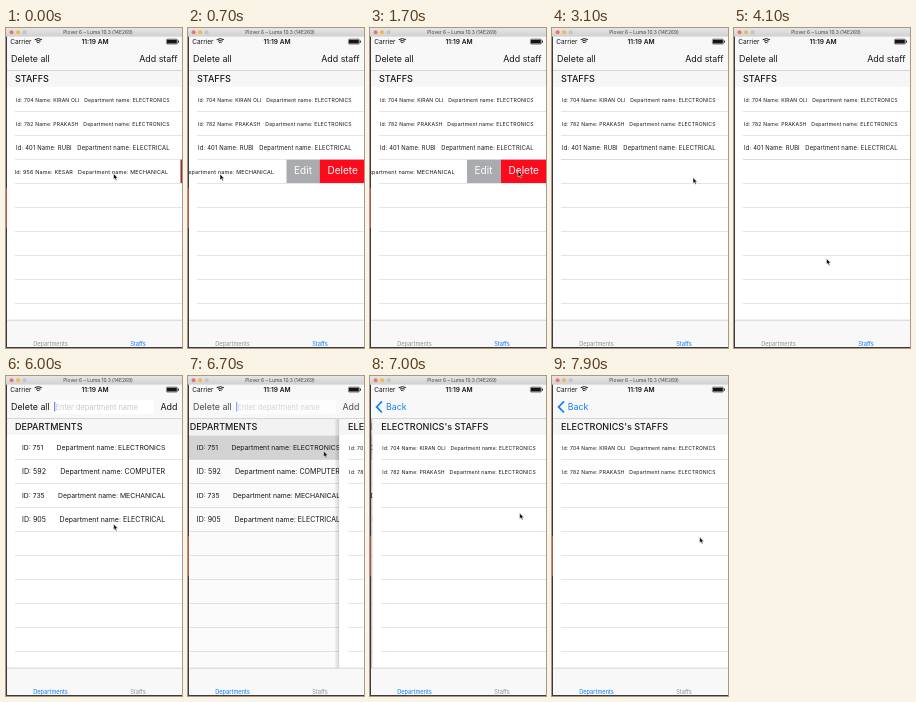
An HTML page for the animation above (8 s loop, 176 px wide and 320 px high).

```html
<!DOCTYPE html>
<html lang="en">
<head>
<meta charset="utf-8">
<title>Staff directory</title>
<style>
html, body { margin: 0; width: 100%; height: 100%; overflow: hidden; background: #fff; }
svg { display: block; width: 100vw; height: 100vh; }
text { font-family: Inter, Roboto, "Liberation Sans", sans-serif; white-space: pre; }
</style>
</head>
<body>
<svg id="stage" viewBox="0 0 176 320">
  <defs>
    <linearGradient id="bar" x2="0" y2="1"><stop stop-color="#e6e6e6"/><stop offset="1" stop-color="#d0d0d0"/></linearGradient>
    <linearGradient id="shade"><stop stop-color="#000" stop-opacity="0"/><stop offset="1" stop-color="#000" stop-opacity=".16"/></linearGradient>
    <clipPath id="rowClip"><rect id="rowWindow" y="131.5" width="176" height="23.5"/></clipPath>
  </defs>
</svg>
<script>
const LOOP = 8000, STEP = 100, W = 174;
const BLUE = '#0d7df7', GRAY = '#929292', INK = '#151515';
const TOP = 42.6, ROW = 24, FIRST = 59.5, TAB = 292;
const stage = document.getElementById('stage');

function add(parent, tag, attrs = {}, label) {
  const el = document.createElementNS('http://www.w3.org/2000/svg', tag);
  for (const key in attrs) el.setAttribute(key, attrs[key]);
  if (label !== undefined) el.textContent = label;
  parent.append(el);
  return el;
}
const group = (parent, attrs) => add(parent, 'g', attrs);
const rect = (parent, x, y, width, height, fill, more) =>
  add(parent, 'rect', { x, y, width, height, fill, ...more });
const text = (parent, x, y, size, label, fill = INK, more) =>
  add(parent, 'text', { x, y, 'font-size': size, fill, ...more }, label);
const move = (el, x, y = 0) => el.setAttribute('transform', `translate(${x} ${y})`);
const fade = (el, value) => el.setAttribute('opacity', value);

const clamp = v => Math.max(0, Math.min(1, v));
const ease = v => v * v * (3 - 2 * v);
const span = (t, from, to) => ease(clamp((t - from) / (to - from)));

// Piecewise eased path through [time, ...values] stops.
function track(stops, t) {
  let i = 1;
  while (i < stops.length - 1 && t > stops[i][0]) i++;
  const [t0, ...a] = stops[i - 1], [t1, ...b] = stops[i];
  const p = span(t, t0, t1);
  return a.map((v, k) => v + (b[k] - v) * p);
}

// Cell labels shrink their type to the room they have.
function cellLabel(parent, x, row, label, room, more) {
  const el = text(parent, x, 0, 10, label, INK, more);
  const size = 10 * room / el.getComputedTextLength();
  el.setAttribute('font-size', size);
  el.setAttribute('y', FIRST + ROW * row + 12.2 + size * .36);
}
const staffLabel = (parent, row, [id, name, dept]) =>
  cellLabel(parent, 10, row, `Id: ${id} Name: ${name}\u00a0\u00a0\u00a0Department name: ${dept}`,
    154, { 'letter-spacing': '.03em' });

function lines(parent, from, to) {
  for (let i = from; i <= to; i++)
    rect(parent, 9, FIRST + ROW * i - .4, 167, .6, '#d3d3d6');
}
function page(title) {
  const g = group(stage);
  rect(g, 0, TOP, 176, TAB - TOP, '#fff');
  rect(g, 0, TOP, 176, FIRST - TOP - .8, '#f6f6f6');
  text(g, 9, 54.3, 9.05, title, '#1c1c1c', { 'font-weight': 500 });
  return g;
}

const staff = [
  ['704', 'KIRAN OLI', 'ELECTRONICS'],
  ['782', 'PRAKASH', 'ELECTRONICS'],
  ['401', 'RUBI', 'ELECTRICAL'],
  ['956', 'KESAR', 'MECHANICAL']
];
const depts = [['751', 'ELECTRONICS'], ['592', 'COMPUTER'], ['735', 'MECHANICAL'], ['905', 'ELECTRICAL']];

// Staff list with a swipeable fourth row
const staffPage = page('STAFFS');
lines(staffPage, 1, 3);
staff.slice(0, 3).forEach((s, i) => staffLabel(staffPage, i, s));
const below = group(staffPage);
lines(below, 4, 10);
const swipeRow = group(staffPage, { 'clip-path': 'url(#rowClip)' });
const rowText = group(swipeRow);
rect(rowText, 0, 131.8, 176, 22.8, '#fff');
move(group(rowText), 0);
staffLabel(rowText, 3, staff[3]);
function action(label, fill) {
  const g = group(swipeRow);
  const back = rect(g, 0, 131.5, 180, 23.5, fill);
  text(g, 7.6, 146.3, 10, label, '#fff');
  return { g, back };
}
const edit = action('Edit', '#a9abae');
const del = action('Delete', '#fc0b1c');

// Department list
const deptPage = page('DEPARTMENTS');
const picked = rect(deptPage, 0, FIRST, 176, ROW, '#d6d6d7');
lines(deptPage, 1, 9);
depts.forEach(([id, name], i) =>
  cellLabel(deptPage, 16, i, `ID: ${id}${'\u00a0'.repeat(7)}Department name: ${name}`, 143.5));
const dim = rect(deptPage, 0, TOP, 176, TAB - TOP, '#000');

// Staff of one department
const detail = page("ELECTRONICS's STAFFS");
lines(detail, 1, 9);
staff.slice(0, 2).forEach((s, i) => staffLabel(detail, i, s));
const shadow = rect(detail, -5, TOP, 5, TAB - TOP, 'url(#shade)');

// Navigation bar
rect(stage, 0, 8, 176, TOP - 8, '#f8f8f8');
rect(stage, 0, TOP - .5, 176, .6, '#bebec0');
const staffNav = group(stage), deptNav = group(stage), backNav = group(stage);
for (const [nav, label] of [[staffNav, 'Add staff'], [deptNav, 'Add']]) {
  text(nav, 5, 34, 8.9, 'Delete all');
  text(nav, 171.5, 34, 8.9, label, INK, { 'text-anchor': 'end' });
}
rect(deptNav, 46.5, 24, 101.5, 14, '#fff', { rx: 2 });
text(deptNav, 49.6, 33.5, 7.4, 'Enter department name', '#c9c9ce');
const caret = rect(deptNav, 48.2, 26, 1, 9.5, '#3f72e8');
add(backNav, 'path', { d: 'M12 25.3L6.6 30.9L12 36.5', fill: 'none', stroke: BLUE, 'stroke-width': 1.7 });
const backLabel = text(backNav, 15.8, 34, 8.8, 'Back', BLUE);

// Status bar
text(stage, 4.2, 16, 6.5, 'Carrier');
for (const r of [2, 4, 6])
  add(stage, 'path', {
    d: `M${32.3 - r * .6} ${16.2 - r * .75}Q32.3 ${16.2 - r * 1.1} ${32.3 + r * .6} ${16.2 - r * .75}`,
    fill: 'none', stroke: INK, 'stroke-width': 1
  });
text(stage, 89, 16, 6.6, '11:19 AM', INK, { 'text-anchor': 'middle', 'font-weight': 600 });
rect(stage, 160.4, 11.1, 11, 5, 'none', { rx: 1, stroke: INK, 'stroke-width': .5 });
rect(stage, 161, 11.7, 9.8, 3.8, INK);
rect(stage, 172, 12.6, .9, 2, INK);

// Tab bar
rect(stage, 0, TAB, 176, 28, '#f8f8f8');
rect(stage, 0, TAB - .2, 176, .6, '#bcbcbe');
const tab = (x, label) => text(stage, x, 317.8, 5.7, label, GRAY, { 'text-anchor': 'middle' });
const deptTab = tab(44.5, 'Departments'), staffTab = tab(132, 'Staffs');

// Window frame
rect(stage, 0, 0, 176, 8.6, 'url(#bar)');
['#f0716a', '#f2b84b', '#c4c4c4'].forEach((fill, i) =>
  add(stage, 'circle', { cx: 5.6 + i * 6.5, cy: 4.3, r: 2, fill }));
text(stage, 92, 6.1, 4.9, 'Plover 6 – Luma 10.3 (14E269)', '#444', { 'text-anchor': 'middle' });
rect(stage, 0, 8.6, 1, 312, '#3b3b3d');
const glow = rect(stage, 0, 160, 1, 40, '#b25a4a');
rect(stage, 0, 319, 176, 1, '#3b3b3d');

const pointer = add(stage, 'path', {
  d: 'M0 0V6L1.4 4.8L2.4 7L3.4 6.5L2.5 4.4H4.3Z',
  fill: '#111', stroke: '#fff', 'stroke-width': .5
});

const pointerPath = [
  [0, 107.5, 145.5], [600, 32, 146], [800, 32, 146], [1500, 148, 143], [1900, 148, 143],
  [2600, 141, 149.5], [3100, 141, 149.5], [3700, 123, 176], [4500, 62, 285],
  [5000, 47, 305.5], [5500, 47, 305.5], [6300, 135.6, 75], [6700, 135.6, 75],
  [7000, 149.6, 137], [7500, 147.6, 161], [8000, 147.6, 161]
];
const swipePath = [[0, 1.5], [600, 76], [800, 79], [1900, 79], [2300, 176]];

function drawSwipe(t) {
  const [open] = track(swipePath, t);
  const gone = span(t, 1900, 2300);
  const shown = Math.min(open, 79), slide = open - shown;
  move(rowText, -open);
  move(edit.g, 176 - shown - slide);
  move(del.g, 176 - shown * 45 / 79 - slide);
  for (const [{ back }, fill, dark] of [[edit, '#a9abae', '#8a2f36'], [del, '#fc0b1c', '#8a2f36']])
    back.setAttribute('fill', open < 4 ? dark : fill);
  document.getElementById('rowWindow').setAttribute('height', 23.5 * (1 - gone));
  fade(swipeRow, gone < 1 ? 1 : 0);
  move(below, 0, -ROW * gone);
}

function drawPush(t) {
  const x = .019 * Math.max(0, t - 6666);
  const p = 1 - (1 + x) * Math.exp(-x);
  move(deptPage, -.3 * W * p);
  fade(dim, .12 * p);
  move(detail, W * (1 - p) + (p < .5 ? 1 : 0));
  fade(detail, p > 0 ? 1 : 0);
  fade(shadow, p < .999 ? 1 : 0);
  fade(backNav, clamp(2 * p - 1));
  move(backLabel, 24 * (1 - p));
  return clamp(1 - 1.8 * p);
}

function draw(t) {
  const onDepts = t >= 5300;
  const navLeft = drawPush(t);
  drawSwipe(t);
  fade(staffPage, onDepts ? 0 : 1);
  fade(staffNav, onDepts ? 0 : 1);
  fade(deptPage, onDepts ? 1 : 0);
  fade(deptNav, onDepts ? navLeft : 0);
  fade(picked, t >= 6500 ? 1 : 0);
  fade(caret, Math.floor((t - 5700) / 500) % 2 ? 0 : 1);
  deptTab.setAttribute('fill', onDepts ? BLUE : GRAY);
  staffTab.setAttribute('fill', onDepts ? GRAY : BLUE);
  fade(glow, t < 2200 || t >= 6500 ? 1 : 0);
  move(pointer, ...track(pointerPath, t));
}

const start = performance.now();
function tick() {
  const t = (performance.now() - start) % LOOP;
  draw(Math.floor(t / STEP) * STEP);
  requestAnimationFrame(tick);
}
tick();
</script>
</body>
</html>
```
